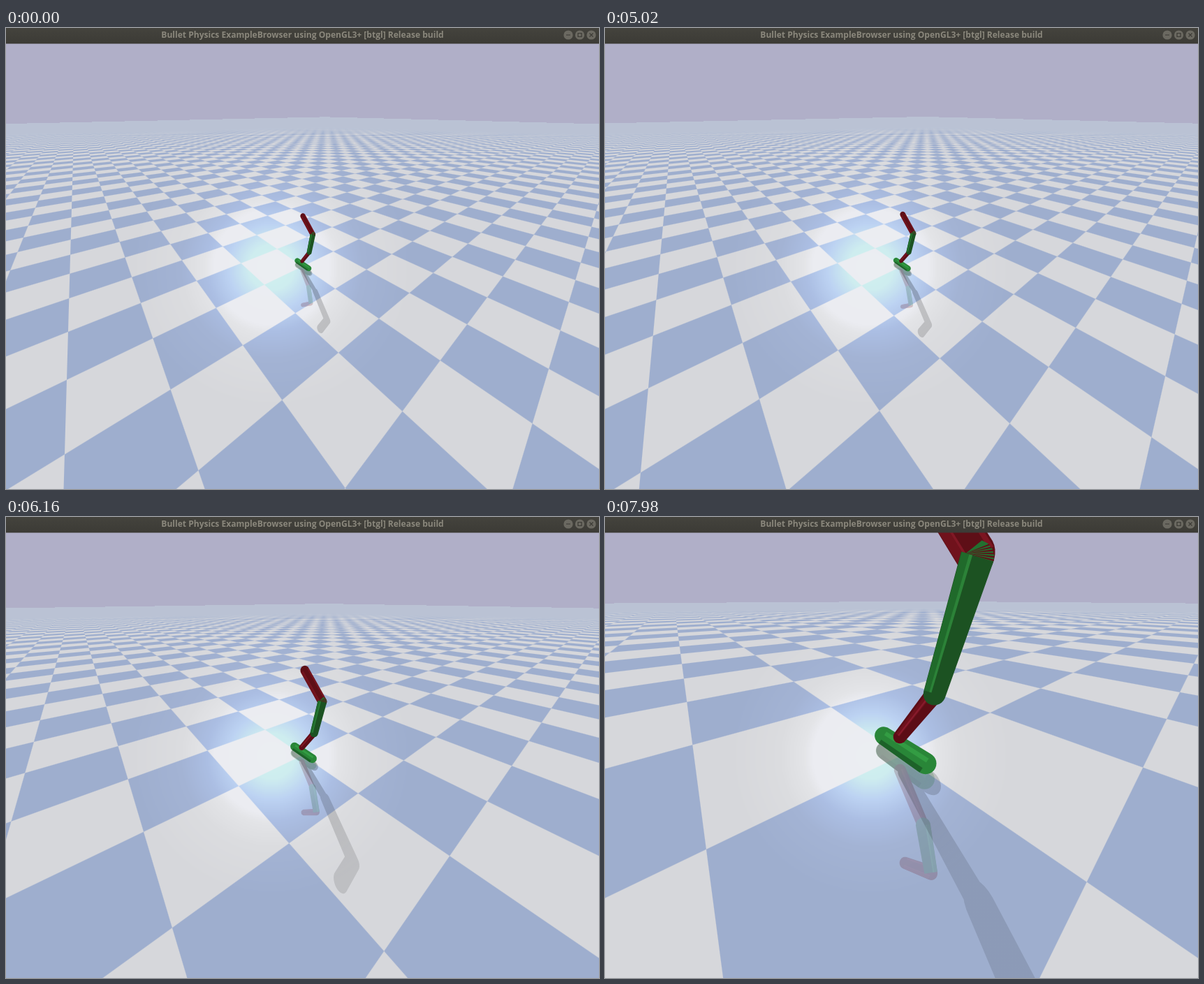
Write an HTML page with a canvas that moves like this. It is 849 px wide and 660 px high and loops after 8 s.

```html
<!DOCTYPE html>
<html lang="en">
<head>
<meta charset="utf-8">
<title>Physics viewer</title>
<style>
  html, body { margin: 0; width: 100%; height: 100%; overflow: hidden; background: #b0afc8; }
  #bar {
    position: absolute; z-index: 1; left: 0; top: 0; width: 849px; height: 22px;
    background: linear-gradient(#44433d, #3c3b36) padding-box;
    border-bottom: 1px solid rgba(60, 59, 54, .5);
    color: #8a877c; text-align: center; white-space: nowrap;
    font: bold 12.06px/20px "Open Sans", "Noto Sans", sans-serif;
  }
  #bar svg { position: absolute; right: 0; top: 0; }
  canvas { position: absolute; left: 0; top: 22px; }
</style>
</head>
<body>
<div id="bar">Bullet Physics ExampleBrowser using OpenGL3+ [btgl] Release build
  <svg width="60" height="22" fill="none" stroke="#3a3934" stroke-width="1.2">
    <g fill="#6b6961" stroke="none">
      <circle cx="16" cy="10" r="6.6"/><circle cx="32.5" cy="10" r="6.6"/><circle cx="49" cy="10" r="6.6"/>
    </g>
    <path d="M13 10h6M30 7.500h5v5h-5zM46.500 7.500l5 5m0-5l-5 5"/>
  </svg>
</div>
<canvas id="view" width="849" height="638"></canvas>
<script>
const LOOP = 8000;
const canvas = document.getElementById('view');
const ctx = canvas.getContext('2d');
const W = canvas.width, H = canvas.height;
const layer = document.createElement('canvas');
layer.width = W;
layer.height = H;
const mirror = layer.getContext('2d');

// Orbit camera: 90 degree vertical field of view, pitch 35, yaw 50.
// The view begins half a pixel below the canvas top.
const FOCAL = (H - 0.5) / 2, CX = W / 2, CY = H - FOCAL;
const rad = deg => deg * Math.PI / 180;
const SIN = Math.sin(rad(35)), COS = Math.cos(rad(35));
const YX = Math.cos(rad(40)), YY = Math.sin(rad(40));
const zoomTimes = [5020, 5060, 5100, 5140, 6000, 6040, 6080, 6120, 6160, 6820,
  6860, 6880, 6920, 6960, 6980, 7020, 7120, 7260];
let dist = 5;

const clamp = (v, lo, hi) => Math.min(hi, Math.max(lo, v));
const mix = (a, b, k) => a + (b - a) * k;

// ---- Floor -------------------------------------------------------------
const SKY = [176, 175, 200];
const GLOW = { x: 380, y: 320, r: 200 };
const blueStops = [[0, 208, 240, 238], [32, 206, 237, 239], [62, 188, 210, 242],
  [92, 171, 190, 227], [130, 163, 179, 212], [200, 158, 174, 206]];
const whiteStops = [[0, 235, 238, 242], [82, 235, 236, 241], [96, 227, 228, 231],
  [130, 219, 220, 223], [200, 214, 215, 219]];

function ramp(stops, r) {
  const i = clamp(stops.findIndex(s => s[0] >= r), 1, stops.length - 1);
  const [a, b] = [stops[i - 1], stops[i]];
  const k = (r - a[0]) / (b[0] - a[0]);
  return [1, 2, 3].map(c => mix(a[c], b[c], k));
}
const blueAt = [], whiteAt = [];
for (let r = 0; r <= GLOW.r; r++) {
  blueAt.push(ramp(blueStops, r));
  whiteAt.push(ramp(whiteStops, r));
}

// Signed distance to the nearest tile edge, softened over one pixel.
function edge(p, width) {
  const cell = Math.floor(p);
  const s = Math.min(1, (0.5 - Math.abs(p - cell - 0.5)) * 2 / width);
  return cell & 1 ? -s : s;
}

const floor = ctx.createImageData(W, H);

function renderFloor() {
  const px = floor.data;
  let i = 0;
  for (let y = 0; y < H; y++) {
    const v = (CY - y - 0.5) / FOCAL;
    const den = SIN - v * COS;
    const b = v * dist / den, z = dist + b * COS;
    const across = z / FOCAL;
    const deep = dist * SIN / (den * den * FOCAL);
    for (let x = 0; x < W; x++, i += 4) {
      const u = (x + 0.5 - CX) / FOCAL;
      const a = u * z;
      const p = YX * a + YY * b, q = YX * b - YY * a;
      px[i + 3] = 255;
      if (den <= 0 || Math.abs(p) > 100 || Math.abs(q) > 100) {
        px[i] = SKY[0]; px[i + 1] = SKY[1]; px[i + 2] = SKY[2];
        continue;
      }
      const slide = u * COS * deep;
      const wp = YX * across + Math.abs(YX * slide + YY * deep);
      const wq = YY * across + Math.abs(YX * deep - YY * slide);
      const fade = clamp((1.8 - Math.max(wp, wq)) / 0.9, 0, 1);
      const blue = 0.5 + 0.5 * fade * edge(p, wp) * edge(q, wq);
      const r = Math.min(GLOW.r, Math.hypot(x - GLOW.x, y - GLOW.y)) | 0;
      for (let c = 0; c < 3; c++) px[i + c] = mix(whiteAt[r][c], blueAt[r][c], blue);
    }
  }
}

// ---- Geometry ----------------------------------------------------------
// A point of the robot's vertical plane on screen: r is pixels per unit,
// (mx, my) the perspective stretch away from the view centre.
function project(px, h) {
  const z = dist - YX * COS * px - SIN * h;
  const mx = YY * px / z, my = (YX * SIN * px - COS * h) / z;
  return { x: CX + FOCAL * mx, y: CY + FOCAL * my, r: FOCAL / z, mx, my };
}

function hull(points) {
  points.sort((a, b) => a[0] - b[0] || a[1] - b[1]);
  const half = list => {
    const out = [];
    for (const p of list) {
      while (out.length > 1) {
        const [a, b] = out.slice(-2);
        if ((b[0] - a[0]) * (p[1] - a[1]) - (b[1] - a[1]) * (p[0] - a[0]) > 0) break;
        out.pop();
      }
      out.push(p);
    }
    return out.slice(0, -1);
  };
  return [...half(points), ...half([...points].reverse())];
}

const ring = fn => Array.from({ length: 28 }, (_, i) => fn(i * Math.PI / 14));

// Outline of a sphere in perspective.
function sphere(p, radius) {
  const r = radius * p.r;
  const gain = 1 / (1 + Math.hypot(1, p.mx, p.my));
  return ring(t => {
    const c = r * Math.cos(t), s = r * Math.sin(t);
    const push = (c * p.mx + s * p.my) * gain;
    return [p.x + c + push * p.mx, p.y + s + push * p.my];
  });
}

function trace(g, points) {
  points.forEach((p, i) => i ? g.lineTo(...p) : g.moveTo(...p));
  g.closePath();
}

function fill(g, points, color) {
  g.beginPath();
  trace(g, points);
  g.fillStyle = color;
  g.fill();
}

// ---- Robot -------------------------------------------------------------
function pose(t) {
  const k = Math.floor(t / 140) * 140 / LOOP;
  const top = [mix(0.012, 0.05, k), mix(1.197, 1.18, k)];
  const hip = [mix(0.31, 0.35, k), mix(0.915, 0.907, k)];
  const knee = [mix(0.216, 0.23, k), mix(0.468, 0.459, k)];
  return [
    { from: [0.208, 0.057], to: [-0.184, 0.06], radius: 0.06, color: '#298638',
      strips: [[-0.55, -0.1, '#339c43'], [0.5, 1, '#1d6229']] },
    { from: knee, to: [-0.015, 0.128], radius: 0.04, color: '#5c0d16',
      strips: [[-0.75, -0.1, '#6f111c'], [-0.4, -0.2, '#871b2c']] },
    { from: top, to: hip, radius: 0.05, color: '#5e0f17',
      strips: [[-0.97, -0.5, '#70121c'], [-0.5, -0.38, '#811825'], [0.65, 0.9, '#7b1521']] },
    { from: hip, to: knee, radius: 0.05, color: '#1c5222', flat: true,
      strips: [[-0.97, -0.4, '#206a2b'], [-0.5, -0.3, '#2c8238']] }
  ];
}

function drawLimb(g, limb, side) {
  const [a, b] = [limb.from, limb.to].map(([x, h]) => project(x, h * side));
  const len = Math.hypot(b.x - a.x, b.y - a.y) || 1;
  const nx = (b.y - a.y) / len, ny = (a.x - b.x) / len;
  const halfWidth = p => p.r * limb.radius * Math.hypot(1, nx * p.mx + ny * p.my);
  const at = (p, f) => [p.x + nx * f * halfWidth(p), p.y + ny * f * halfWidth(p)];
  const start = limb.flat ? [at(a, -1), at(a, 1)] : sphere(a, limb.radius);
  fill(g, hull([...start, ...sphere(b, limb.radius)]), limb.color);
  for (const [f0, f1, color] of limb.strips)
    fill(g, [at(a, f0), at(a, f1), at(b, f1), at(b, f0)], color);
  if (limb.flat && side > 0) drawJoint(g, a, halfWidth(a), Math.atan2(ny, nx));
}

// The overlapping end caps show as a fan of thin wedges.
function drawJoint(g, p, r, angle) {
  const apex = [p.x - 0.7 * r * Math.cos(angle), p.y - 0.7 * r * Math.sin(angle)];
  const rim = f => [p.x + r * Math.cos(angle - f * 1.6), p.y + r * Math.sin(angle - f * 1.6)];
  const wedge = (f0, f1, color) =>
    fill(g, [apex, ...[0, 0.25, 0.5, 0.75, 1].map(k => rim(mix(f0, f1, k)))], color);
  wedge(0, 1, '#237030');
  for (let i = 0; i < 6; i++) wedge(0.02 + i * 0.125, 0.085 + i * 0.125, '#5e0f17');
}

// ---- Shadow: each limb is projected along the light on to the floor -----
const LIGHT = [0.232, -1.45];
const SLANT = Math.hypot(...LIGHT);
const STRETCH = Math.hypot(1, SLANT);
const [LX, LY] = LIGHT.map(c => c / SLANT);

// Shadow also removes the highlight, so it is deeper near its centre.
const shade = ctx.createRadialGradient(GLOW.x, GLOW.y, 0, GLOW.x, GLOW.y, GLOW.r);
for (const [at, alpha] of [[0, 0.28], [0.31, 0.23], [0.48, 0.16], [1, 0.115]])
  shade.addColorStop(at, `rgba(0,0,0,${alpha})`);

function shadowRing([x, h], r) {
  const a = YY * x + LIGHT[0] * h, b = -YX * x + LIGHT[1] * h;
  return ring(t => {
    const along = STRETCH * r * Math.cos(t), side = r * Math.sin(t);
    return [a + LX * along - LY * side, b + LY * along + LX * side];
  });
}

function clipNear(points) {
  const depth = p => dist + p[1] * COS - 0.05;
  return points.flatMap((p, i) => {
    const next = points[(i + 1) % points.length];
    const d0 = depth(p), d1 = depth(next), out = d0 > 0 ? [p] : [];
    if (d0 > 0 !== d1 > 0) out.push(p.map((c, j) => mix(c, next[j], d0 / (d0 - d1))));
    return out;
  });
}

function drawShadow(limbs) {
  ctx.beginPath();
  for (const { from, to, radius } of limbs) {
    const outline = clipNear(hull([...shadowRing(from, radius), ...shadowRing(to, radius)]));
    trace(ctx, outline.map(([a, b]) => {
      const z = dist + b * COS;
      return [CX + FOCAL * a / z, CY - FOCAL * b * SIN / z];
    }));
  }
  ctx.fillStyle = shade;
  ctx.fill();
}

// ---- Loop --------------------------------------------------------------
let renderedDist = 0, startTime;

function frame(now) {
  startTime ??= now;
  const t = (now - startTime) % LOOP;
  dist = 5 - 0.2 * zoomTimes.filter(z => t >= z).length;
  if (dist !== renderedDist) {
    renderFloor();
    renderedDist = dist;
  }
  ctx.putImageData(floor, 0, 0);

  const limbs = pose(t);
  mirror.clearRect(0, 0, W, H);
  limbs.forEach(limb => drawLimb(mirror, limb, -1));
  ctx.globalAlpha = 0.2;
  ctx.drawImage(layer, 0, 0);
  ctx.globalAlpha = 1;
  drawShadow(limbs);
  limbs.forEach(limb => drawLimb(ctx, limb, 1));
  requestAnimationFrame(frame);
}
requestAnimationFrame(frame);
</script>
</body>
</html>
```
